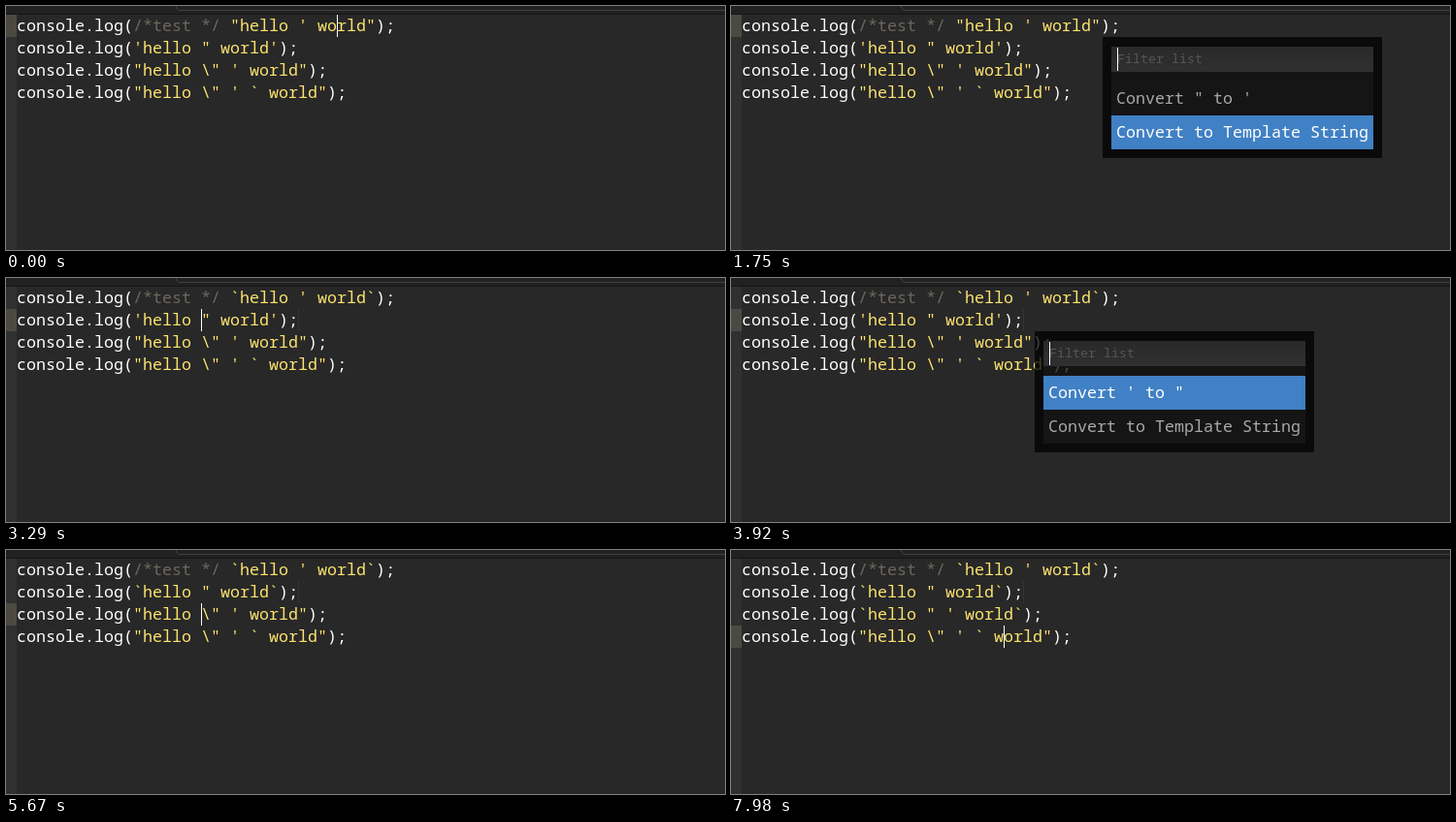
An HTML page with a canvas that plays this animation: 741x252 px, repeating every 8 s.

```html
<!DOCTYPE html>
<html lang="en">
<head>
<meta charset="utf-8">
<title>Quote conversion</title>
<style>
html, body { margin: 0; width: 741px; height: 252px; overflow: hidden; background: #282828; }
canvas { display: block; }
</style>
</head>
<body>
<canvas id="stage" width="741" height="252"></canvas>
<script>
const ctx = document.getElementById('stage').getContext('2d');
const LOOP = 8000, TICK = 70, LEFT = 11, TOP = 9, CHAR = 10, ROW = 23;
const MONO = '"Noto Sans Mono", "DejaVu Sans Mono", monospace';
const WHITE = '#fff', YELLOW = '#fbe26e', GREY = '#6d675f';

// Each string literal with the time it becomes a template string.
const rows = [
  { note: '/*test */ ', before: `"hello ' world"`, after: "`hello ' world`", at: 2100 },
  { note: '', before: `'hello " world'`, after: '`hello " world`', at: 4480 },
  { note: '', before: `"hello \\" ' world"`, after: "`hello \" ' world`", at: 6790 },
  { note: '', before: '"hello \\" \' ` world"', after: '', at: Infinity }
];

// Key presses: the caret runs from the previous column to this one, one tick per step.
const moves = [
  { at: 0, row: 0, col: 33 },
  { at: 350, row: 0, col: 24, steps: 4, hide: 1050 },
  { at: 2100, row: 0, col: 37 },
  { at: 2380, row: 1, col: 29 },
  { at: 2450, row: 1, col: 28 },
  { at: 2940, row: 1, col: 17, steps: 7, hide: 3710 },
  { at: 4550, row: 1, col: 27 },
  { at: 4900, row: 2, col: 26 },
  { at: 5390, row: 2, col: 21, steps: 3 },
  { at: 5670, row: 2, col: 19, hide: 5950 },
  { at: 6860, row: 2, col: 29 },
  { at: 7350, row: 3, col: 29 },
  { at: 7490, row: 3, col: 28 },
  { at: 7980, row: 3, col: 27 }
];

const menus = [
  { open: 1260, move: 1750, close: 2100, first: `Convert " to '` },
  { open: 3850, move: 4270, close: 4480, first: `Convert ' to "` },
  { open: 5950, move: 6370, close: 6790, first: `Convert " to '` }
];

const colX = col => LEFT + col * CHAR;
const rowY = row => TOP + row * ROW;

function caretAt(t) {
  const i = moves.findLastIndex(m => m.at <= t);
  const { at, row, col, steps = 1, hide = Infinity } = moves[i];
  const from = i ? moves[i - 1].col : col;
  const done = Math.min(1, (Math.floor((t - at) / TICK) + 1) / steps);
  return { row, col: Math.round(from + (col - from) * done), visible: t < hide };
}

function box(x, y, w, h, color) {
  ctx.fillStyle = color;
  ctx.fillRect(x, y, w, h);
}

function text(str, x, y, color, step = CHAR, weight = 500) {
  ctx.font = `${weight} ${step / 0.6}px ${MONO}`;
  ctx.fillStyle = color;
  [...str].forEach((ch, i) => ctx.fillText(ch, x + i * step, y));
}

function drawFrame(row) {
  box(0, 0, 741, 252, '#282828');
  box(0, TOP, LEFT, 252 - TOP, '#2f3130');
  box(0, rowY(row), LEFT, ROW, '#4c4941');
  box(0, 0, 741, TOP, '#212121');
  box(0, TOP - 1, 741, 1, '#161616');
  ctx.beginPath();
  ctx.moveTo(175.5, 0);
  ctx.quadraticCurveTo(175.5, 4.5, 180, 4.5);
  ctx.lineTo(741, 4.5);
  ctx.strokeStyle = '#414141';
  ctx.lineWidth = 1;
  ctx.stroke();
}

// Returns the column of the closing bracket.
function drawRow(row, i, t) {
  const literal = t >= row.at ? row.after : row.before;
  let col = 0;
  for (const [part, color] of [['console.log(', WHITE], [row.note, GREY], [literal, YELLOW], [');', WHITE]]) {
    text(part, colX(col), rowY(i) + 17, color);
    col += part.length;
  }
  return col - 2;
}

function underline(row, col) {
  for (let x = 0; x < CHAR; x += 2) box(colX(col) + x, rowY(row) + 21, 1, 1, '#6f9460');
}

function drawMenu(menu, row, col, t) {
  const x = colX(col) + 132, y = rowY(row + 1);
  const picked = t >= menu.move ? 1 : 0;
  box(x, y, 288, 125, 'rgba(0,0,0,.75)');
  box(x + 9, y + 36, 270, 10, 'rgba(255,255,255,.04)');
  const fill = ctx.createLinearGradient(0, y + 10, 0, y + 36);
  fill.addColorStop(0, '#292929');
  fill.addColorStop(1, '#303032');
  box(x + 9, y + 10, 270, 26, fill);
  text('Filter list', x + 15, y + 27, '#565656', 8, 400);
  box(x + 15, y + 11, 1, 24, '#fff');
  [menu.first, 'Convert to Template String'].forEach((label, i) => {
    const on = i === picked, top = y + 46 + i * 35;
    box(x + 9, top, 270, 35, on ? '#4080c4' : '#151515');
    text(label, x + 14, top + 23, on ? '#fff' : '#a9a9a9');
  });
}

function draw(t) {
  const { row, col, visible } = caretAt(t);
  drawFrame(row);
  const close = rows.map((r, i) => drawRow(r, i, t))[row];
  if (col === close || col === close + 1) {
    underline(row, 11);
    underline(row, close);
  }
  if (t >= 2450) box(colX(29), rowY(1), 1, ROW, '#343434'); // faint caret trail
  if (visible) box(colX(col), rowY(row), 1, ROW, '#fff');
  const menu = menus.find(m => t >= m.open && t < m.close);
  if (menu) drawMenu(menu, row, col, t);
}

const start = performance.now();
function tick() {
  draw((performance.now() - start) % LOOP);
  requestAnimationFrame(tick);
}
tick();
</script>
</body>
</html>
```
